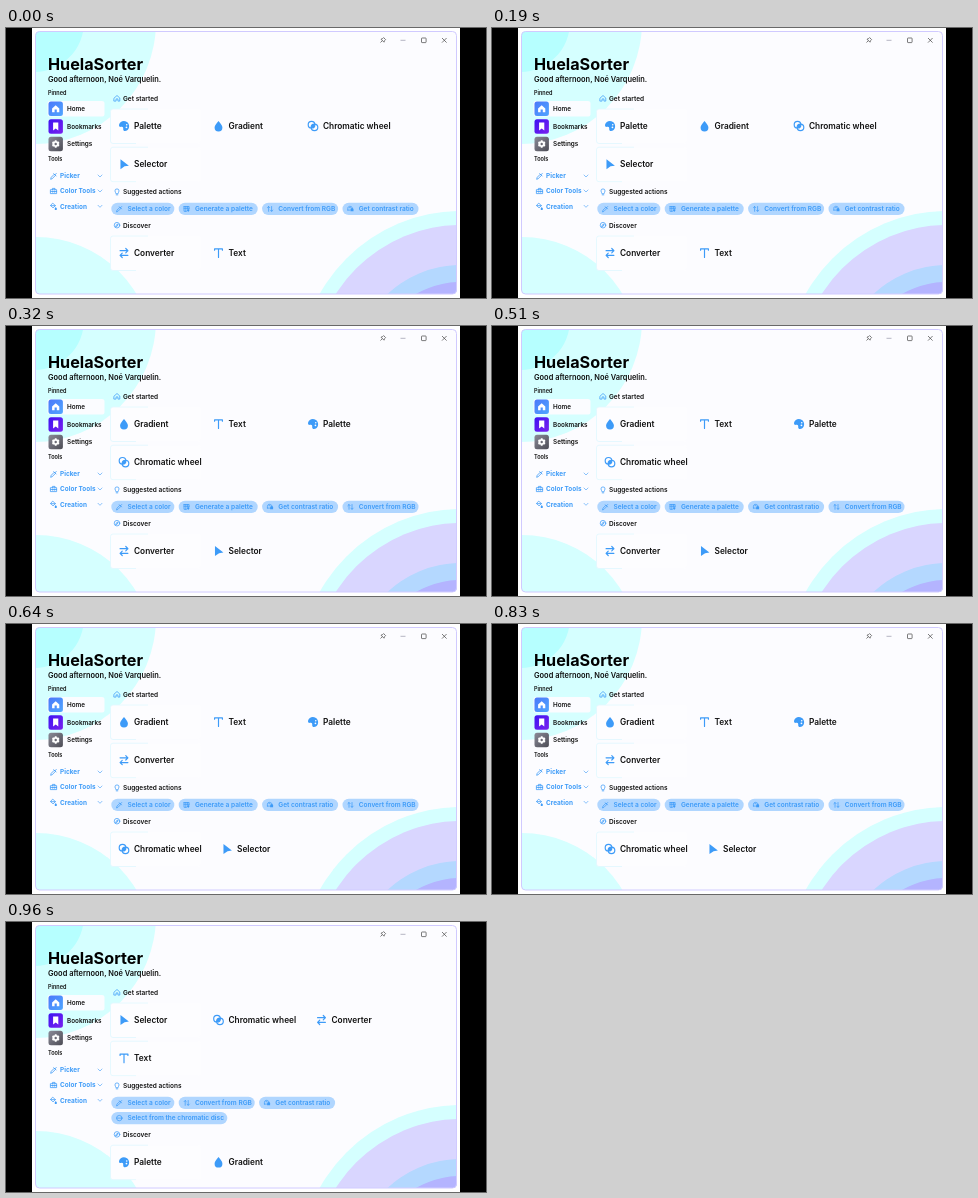
These frames come from a looping animation (480 px wide and 270 px high, 1280 ms). An HTML page:

```html
<!DOCTYPE html>
<html lang="en">
<head>
<meta charset="utf-8">
<title>HuelaSorter</title>
<style>
html, body { margin: 0; width: 100%; height: 100%; overflow: hidden; background: #000; }
svg { display: block; width: 480px; height: 270px; font-family: Inter, "Open Sans", sans-serif; font-weight: 600; }
.line { fill: none; stroke: #3d9bf8; stroke-width: 1.2; stroke-linecap: round; stroke-linejoin: round; }
.fill { fill: #3d9bf8; }
.dark { fill: none; stroke: #444; stroke-width: .7; }
</style>
</head>
<body>
<svg viewBox="0 0 480 270">
  <defs>
    <clipPath id="window"><rect x="29.5" y="3.5" width="421" height="262.5" rx="4"/></clipPath>
    <linearGradient id="home" x2="1" y2="1"><stop stop-color="#4b78fa"/><stop offset="1" stop-color="#4fa6ff"/></linearGradient>
    <linearGradient id="book" x2="1" y2="1"><stop stop-color="#3d12f2"/><stop offset="1" stop-color="#7a22ee"/></linearGradient>
    <linearGradient id="gear" x2="1" y2="1"><stop stop-color="#8b8b98"/><stop offset="1" stop-color="#4c4c55"/></linearGradient>
  </defs>
  <rect x="26" width="428" height="270" fill="#fff"/>
  <g clip-path="url(#window)">
    <rect x="29" y="3" width="422" height="264" fill="#fcfcff"/>
    <circle cx="28" cy="-6" r="122" fill="#d5ffff"/>
    <circle cx="28" cy="-6" r="50" fill="#b6ffff"/>
    <circle cx="30" cy="326" r="117" fill="#d5ffff"/>
    <circle cx="455" cy="345" r="162" fill="#d5ffff"/>
    <circle cx="455" cy="345" r="148" fill="#d9d6ff"/>
    <circle cx="455" cy="345" r="108" fill="#b4d8ff"/>
    <circle cx="455" cy="345" r="91" fill="#b4b4ff"/>
  </g>
  <rect x="29.5" y="3.5" width="421" height="262.5" rx="4" fill="none" stroke="#d0caff"/>
  <g id="frame"></g>
  <g id="content"></g>
</svg>
<script>
const BLUE = '#3d9bf8', INK = '#111';
const $ = id => document.getElementById(id);
const line = d => `<path class="line" d="${d}"/>`;
const fill = d => `<path class="fill" fill-rule="evenodd" d="${d}"/>`;
const ring = (x, y, r) => `<circle class="line" cx="${x}" cy="${y}" r="${r}"/>`;

// Each icon is drawn around 0,0 in a box of about 10 units.
const icons = {
  Palette: fill('M-5 -1.5C-4 -5 0 -6 3 -4C6 -2 6 3 3 4.6C1 5.6 -1 5 -.8 3C-.6 1 -1.5 .3 -3 .8C-4.5 1.3 -5.4 0 -5 -1.5ZM1.6 1.4a.9 .9 0 1 0 1.8 0a.9 .9 0 1 0 -1.8 0M2 -1.2a.8 .8 0 1 0 1.6 0a.8 .8 0 1 0 -1.6 0'),
  Gradient: fill('M0 -5.2C2 -2.5 4 -.5 4 1.5A4 4 0 0 1 -4 1.5C-4 -.5 -2 -2.5 0 -5.2Z'),
  'Chromatic wheel': ring(-1.5, -1.4, 3.4) + ring(1.5, 1.4, 3.4) +
    fill('M-1.9 2A3.4 3.4 0 0 0 1.9 -2A3.4 3.4 0 0 0 -1.9 2Z'),
  Selector: fill('M-3.6 -5L5 1.6L.6 2.2L-3.6 5.2Z'),
  Converter: line('M-4 -2.4H4M1.8 -4.6L4 -2.4L1.8 -.2M4 2.4H-4M-1.8 .2L-4 2.4L-1.8 4.6'),
  Text: line('M-4 -2.8V-4.2H4V-2.8M0 -4.2V4.6'),
  house: line('M-4.5 -.5L0 -4.5L4.5 -.5V4.5H1.5V1H-1.5V4.5H-4.5Z'),
  bulb: line('M-1.7 2.2C-1.7 1 -3.3 .2 -3.3 -1.7A3.3 3.3 0 0 1 3.3 -1.7C3.3 .2 1.7 1 1.7 2.2ZM-1.3 4.6H1.3'),
  compass: ring(0, 0, 4.5) + line('M-2 2L-.8 -.8L2 -2L.8 .8Z'),
  dropper: line('M-4.5 4.5L-3.8 2L1 -2.8L2.8 -1L-2 3.8ZM0 -3.6L3.6 0M2 -2L4 -4'),
  grid: line('M-4.5 -4H4V0M-4.5 -4V4H-.5M-4.5 -1H4M-1.5 -4V4M1.5 -4V0') + fill('M0 2L2.5 0L5 2L2.5 5Z'),
  swap: line('M-2.5 4V-4M-4.5 -2L-2.5 -4L-.5 -2M2.5 -4V4M.5 2L2.5 4L4.5 2'),
  contrast: line('M-4.5 2V-1C-4.5 -5.5 3 -5.5 3.5 -1M-4.5 2H-1M-2 -2H0') + fill('M0 1A2.5 2.5 0 1 1 5 1V4H0Z'),
  disc: ring(0, 0, 4.5) + line('M-4.5 0H4.5'),
  toolbox: line('M-4.5 -2H4.5V4H-4.5ZM-2 -2V-4H2V-2M-4.5 .8H4.5M-1.5 0V2M1.5 0V2'),
  blend: line('M-1 -4.5L2.5 -1L-1 2.5L-4.5 -1ZM-4.5 -1H2.5') + fill('M3.2 1L4.8 3.2A1.8 1.8 0 1 1 1.6 3.2Z')
};

const icon = (name, x, y, scale = .62) =>
  `<g transform="translate(${x} ${y}) scale(${scale})">${icons[name]}</g>`;
const text = (str, x, y, size, color = INK, weight = 600) =>
  `<text x="${x}" y="${y + size * .36}" font-size="${size}" fill="${color}" font-weight="${weight}">${str}</text>`;
const heading = (str, glyph, y) => icon(glyph, 111, y) + text(str, 117, y, 6.5);

const tile = (y, paint, glyph, label) =>
  `<rect x="42.5" y="${y - 7.2}" width="14.4" height="14.4" rx="2.5" fill="url(#${paint})"/>` +
  `<path transform="translate(49.7 ${y})" fill="#fff" fill-rule="evenodd" d="${glyph}"/>` + text(label, 61, y, 6.35);
const menu = (y, glyph, label) => icon(glyph, 47.7, y, .65) + text(label, 54, y, 6.45, BLUE, 700) +
  `<path class="line" style="stroke-width:.6" d="M92 ${y - 1}l2 2l2 -2"/>`;

$('frame').innerHTML =
  text('HuelaSorter', 42, 36, 16.2, '#000', 700) +
  text('Good afternoon, Noé Varquelin.', 42, 51.8, 7.45) +
  text('Pinned', 42, 65, 5.5) + text('Tools', 42, 131.5, 5.5) +
  '<rect x="41.5" y="73" width="57" height="15.5" rx="2.5" fill="#fbfcff"/>' +
  tile(80.8, 'home', 'M-3.6 -.3L0 -3.6L3.6 -.3V3.5H1.1V.8H-1.1V3.5H-3.6Z', 'Home') +
  tile(98.5, 'book', 'M-2.6 -4H2.6V4L0 2L-2.6 4Z', 'Bookmarks') +
  tile(116, 'gear', 'M-.8 -3.8H.8L1.2 -2.6L2.9 -2.6L3.8 -1L2.9 0L3.8 1L2.9 2.6L1.2 2.6L.8 3.8H-.8L-1.2 2.6L-2.9 2.6L-3.8 1L-2.9 0L-3.8 -1L-2.9 -2.6L-1.2 -2.6ZM-1.2 0a1.2 1.2 0 1 0 2.4 0a1.2 1.2 0 1 0 -2.4 0', 'Settings') +
  menu(148, 'dropper', 'Picker') + menu(163, 'toolbox', 'Color Tools') + menu(178.3, 'blend', 'Creation') +
  '<path class="dark" d="M374.5 14.5l1.8 -1.8M375 11.2l3 3l.6 -1.6l1 -1l-2 -2l-1 1ZM436 10l4.6 4.6m0 -4.6l-4.6 4.6"/>' +
  '<rect class="dark" x="415.5" y="10" width="4.6" height="4.6" rx=".6"/>' +
  '<path class="dark" style="stroke:#99a" d="M394.5 12.3h5"/>' +
  heading('Get started', 'house', 70.3) + heading('Suggested actions', 'bulb', 164);

const chips = {
  select: ['Select a color', 'dropper', 63],
  palette: ['Generate a palette', 'grid', 79],
  rgb: ['Convert from RGB', 'swap', 76],
  ratio: ['Get contrast ratio', 'contrast', 76],
  wheel: ['Select from the chromatic disc', 'disc', 116]
};

// Cards grow with their label, so later ones in a row shift right.
function cardRow(names, y) {
  let x = 105;
  return '<rect x="104.5" y="' + (y - 17) + '" width="90" height="34.5" rx="2.5" fill="#fdfdff"/>' +
    `<path d="M142 ${y - 17}H107q-2.5 0 -2.5 2.5V${y + 15}q0 2.5 2.5 2.5H130" fill="none" stroke="#e0f8ff" stroke-width=".8"/>` +
    names.map(name => {
      const card = icon(name, x + 13, y, .98) + text(name, x + 23, y, 8.3);
      x += name === 'Chromatic wheel' ? 103 : 94.5;
      return card;
    }).join('');
}

function chipRow(keys, y) {
  let x = 105.3;
  return keys.map(key => {
    const [label, glyph, width] = chips[key];
    const chip = `<rect x="${x}" y="${y - 6.2}" width="${width}" height="12.4" rx="6.2" fill="#b0d6ff"/>` +
      icon(glyph, x + 8, y, .6) + text(label, x + 16.2, y, 6.55, BLUE);
    x += width + 4.4;
    return chip;
  }).join('');
}

const [P, G, C, S, V, T] = ['Palette', 'Gradient', 'Chromatic wheel', 'Selector', 'Converter', 'Text'];
const calm = ['select', 'palette', 'ratio', 'rgb'];
const scenes = [
  { cards: [P, G, C, S], chips: ['select', 'palette', 'rgb', 'ratio'], more: [V, T] },
  { cards: [G, T, P, C], chips: calm, more: [V, S] },
  { cards: [G, T, P, V], chips: calm, more: [C, S] },
  { cards: [S, C, V, T], chips: ['select', 'rgb', 'ratio'], extra: ['wheel'], more: [P, G] }
];

function render({ cards, chips, extra = [], more }) {
  const shift = extra.length ? 15.2 : 0;
  return cardRow(cards.slice(0, 3), 98) + cardRow(cards.slice(3), 136.2) +
    chipRow(chips, 180.9) + chipRow(extra, 196.1) +
    heading('Discover', 'compass', 197.2 + shift) + cardRow(more, 225 + shift);
}

let shown = -1;
function tick() {
  const index = Math.floor(performance.now() % 1280 / 320);
  if (index !== shown) $('content').innerHTML = render(scenes[shown = index]);
  requestAnimationFrame(tick);
}
tick();
</script>
</body>
</html>
```
